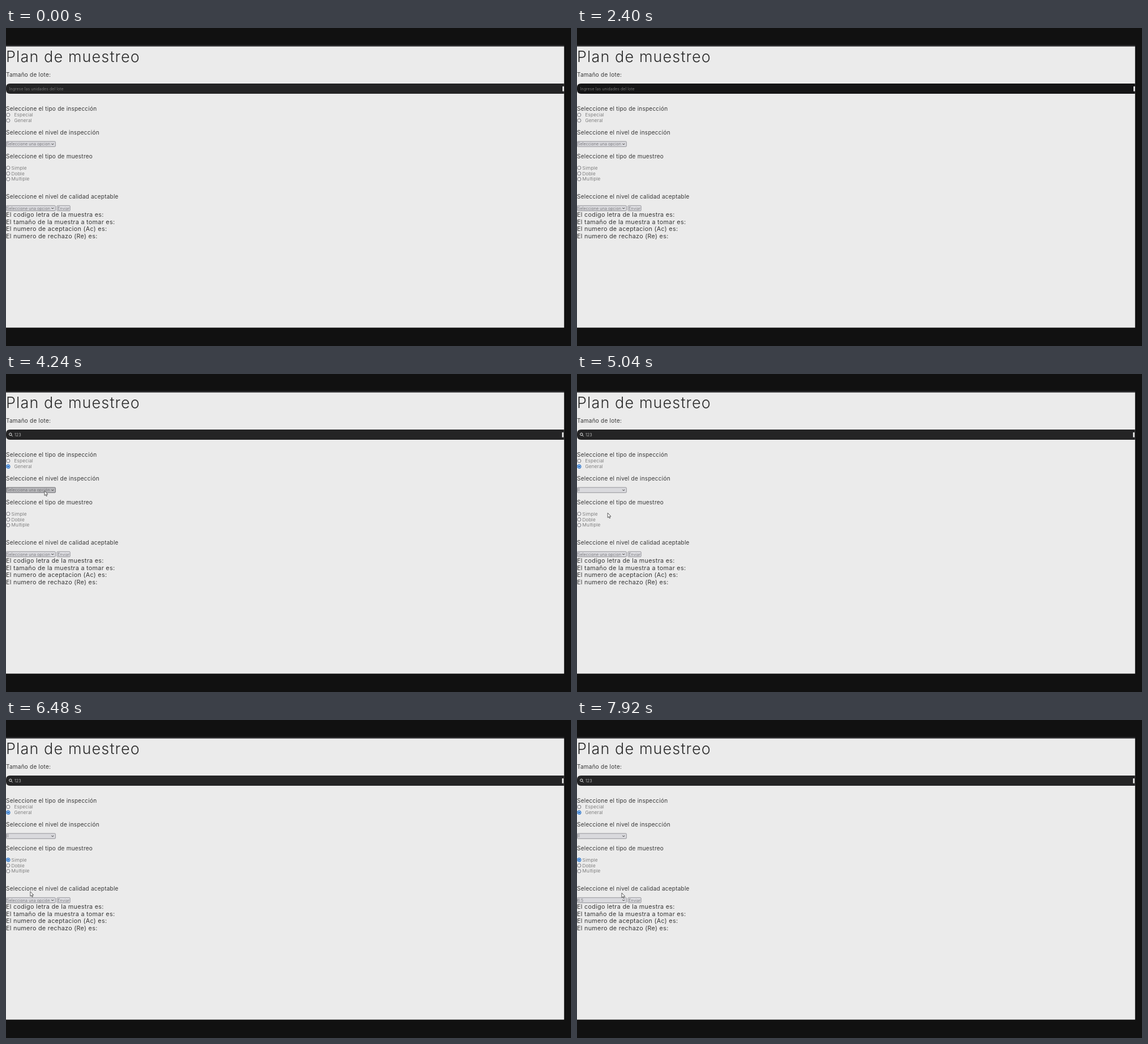
These frames come from a looping animation (998 px wide and 561 px high, 8000 ms). An HTML page:

```html
<!DOCTYPE html>
<html lang="es">
<head>
<meta charset="utf-8">
<title>Plan de muestreo</title>
<style>
html, body { margin: 0; width: 100%; height: 100%; overflow: hidden; background: #111; }
svg { display: block; width: 998px; height: 561px; font-family: Inter, "Open Sans", sans-serif; }
.title { font-size: 27px; font-weight: 300; letter-spacing: .041em; fill: #2c2c2c; }
.label { font-size: 10px; letter-spacing: .024em; fill: #383838; }
.result { font-size: 10.8px; letter-spacing: .027em; fill: #383838; }
.option { font-size: 8.2px; font-weight: 300; letter-spacing: .027em; fill: #606060; }
.control { font-size: 7.1px; font-weight: 300; letter-spacing: .012em; fill: #5c5c60; }
.hint { font-size: 7.1px; font-weight: 300; letter-spacing: .01em; fill: #858585; }
.value { font-size: 7.2px; font-weight: 300; fill: #dcdcdc; }
.box { stroke: #8e8e94; stroke-width: .9; }
.ring { fill: #f1f1f1; stroke: #66666c; stroke-width: .9; }
.on .ring { fill: #fff; stroke: #1668c8; stroke-width: 1.2; }
.dot { fill: #1668c8; visibility: hidden; }
.on .dot { visibility: visible; }
</style>
</head>
<body>
<svg id="stage" viewBox="0 0 998 561">
  <rect width="998" height="561" fill="#111"/>
  <rect y="30" width="986" height="3" fill="#29292b"/>
  <rect y="32.6" width="985.8" height="496" fill="#ebebeb"/>
  <path id="bar" d="M985.8 98H7Q0 98 0 105V109Q0 116 7 116H985.8Z"/>
  <rect id="spin" x="983" y="103" width="2.6" height="8.6" fill="#efefef"/>
  <g id="lens" fill="none" stroke="#eee" stroke-width="1"><circle cx="7.8" cy="106.3" r="2.2"/><path d="M9.5 108L11.7 110.2"/></g>
</svg>
<script>
const LOOP = 8000, STEP = 80;
const stage = document.getElementById('stage');
const byId = id => document.getElementById(id);

function add(tag, attrs, parent = stage) {
  const el = document.createElementNS('http://www.w3.org/2000/svg', tag);
  for (const k in attrs) el.setAttribute(k, attrs[k]);
  return parent.appendChild(el);
}

function text(cls, x, y, str) {
  const el = add('text', { class: cls, x, y });
  el.textContent = str;
  return el;
}

function radio(y, x, str) {
  const g = add('g', {});
  add('circle', { class: 'ring', cx: 3.8, cy: y, r: 3.1 }, g);
  add('circle', { class: 'dot', cx: 3.8, cy: y, r: 1.8 }, g);
  text('option', x, y + 2.8, str);
  return g;
}

function select(y) {
  const box = add('rect', { class: 'box', x: .4, y, width: 87, height: 9.2, rx: 1.2 });
  const label = text('control', 1, y + 7.2, '');
  add('path', { d: `M80.4 ${y + 3.8}l1.9 1.9l1.9 -1.9`, fill: 'none', stroke: '#222', 'stroke-width': 1 });
  return (str, hover) => {
    label.textContent = str;
    box.setAttribute('fill', hover ? '#b9b9bc' : '#d9d9dd');
    box.style.stroke = hover ? '#66666a' : '';
  };
}

text('title', 0, 59.5, 'Plan de muestreo');
[[85.6, 'Tamaño de lote:'],
 [145.8, 'Seleccione el tipo de inspección'],
 [187.5, 'Seleccione el nivel de inspección'],
 [229.5, 'Seleccione el tipo de muestreo'],
 [300.6, 'Seleccione el nivel de calidad aceptable']
].forEach(([y, s]) => text('label', 0, y, s));
['El codigo letra de la muestra es:',
 'El tamaño de la muestra a tomar es:',
 'El numero de aceptacion (Ac) es:',
 'El numero de rechazo (Re) es:'
].forEach((s, i) => text('result', 0, 333.3 + i * 12.45, s));

const hint = text('hint', 5.5, 109.7, 'Ingrese las unidades del lote');
const value = text('value', 15, 109.7, '');
radio(153.3, 14.5, 'Especial');
const general = radio(163.2, 14.5, 'General');
const simple = radio(246.7, 9.5, 'Simple');
radio(256.7, 9.5, 'Doble');
radio(266.6, 9.5, 'Multiple');
const level = select(200.1);
const quality = select(313.3);
add('rect', { class: 'box', x: 90, y: 313.3, width: 23.2, height: 9.2, rx: 1.2, fill: '#dedee2' });
text('control', 91.2, 320.5, 'Enviar');
const cursor = add('path', {
  d: 'M0 0V8.4L1.9 6.7L3.2 9.6L4.5 9L3.2 6.2H5.8Z',
  fill: '#fff', stroke: '#333', 'stroke-width': .8, 'stroke-linejoin': 'round'
});

// Pointer stops: time, x, y
const path = [
  [1760, 281, 169], [2080, 165, 128], [2320, 95, 108], [2880, 95, 108],
  [3120, 78, 138], [3360, 52, 159], [3520, 5, 161], [3760, 5, 161],
  [4160, 66, 204], [4240, 68, 206], [4480, 68, 206], [4800, 60, 245],
  [4960, 60, 245], [5360, 4, 245], [5680, 4, 245], [5920, 25, 253],
  [6400, 42, 300], [6720, 48, 317], [6800, 49, 320], [6960, 41, 296],
  [7040, 41, 296], [7440, 35, 256], [7680, 35, 256], [7920, 79, 305]
];

function pointAt(t) {
  const i = path.findIndex(p => p[0] > t);
  if (i < 0) return path[path.length - 1].slice(1);
  const [t0, x0, y0] = path[Math.max(0, i - 1)], [t1, x1, y1] = path[i];
  const k = t1 > t0 ? (t - t0) / (t1 - t0) : 0;
  const e = k * k * (3 - 2 * k);
  return [x0 + (x1 - x0) * e, y0 + (y1 - y0) * e];
}

function draw(t) {
  const typed = t < 2560 ? 0 : Math.min(3, 1 + Math.floor((t - 2560) / 160));
  value.textContent = '123'.slice(0, typed);
  hint.style.visibility = typed ? 'hidden' : 'visible';
  byId('lens').style.visibility = typed ? 'visible' : 'hidden';
  byId('spin').setAttribute('x', typed ? 982.2 : 983);
  byId('bar').setAttribute('fill', t >= 2400 && t < 3600 ? '#151516' : '#242425');
  general.setAttribute('class', t >= 3600 ? 'on' : '');
  simple.setAttribute('class', t >= 5520 ? 'on' : '');
  level(t < 3600 ? 'Seleccione una opcion' : t < 4960 ? 'Selecciona una opción' : 'II',
    t >= 4160 && t < 4960);
  quality(t < 5520 ? 'Seleccione una opcion' : t < 7600 ? 'Selecciona una opción' : '6.5',
    t >= 6720 && t < 7600);
  const shown = t >= 1760 && (t < 2400 || t >= 2960);
  cursor.style.visibility = shown ? 'visible' : 'hidden';
  const [x, y] = pointAt(t);
  cursor.setAttribute('transform', `translate(${x} ${y})`);
}

const start = performance.now();
function tick() {
  const t = (performance.now() - start) % LOOP;
  draw(Math.floor(t / STEP) * STEP);
  requestAnimationFrame(tick);
}
tick();
</script>
</body>
</html>
```
